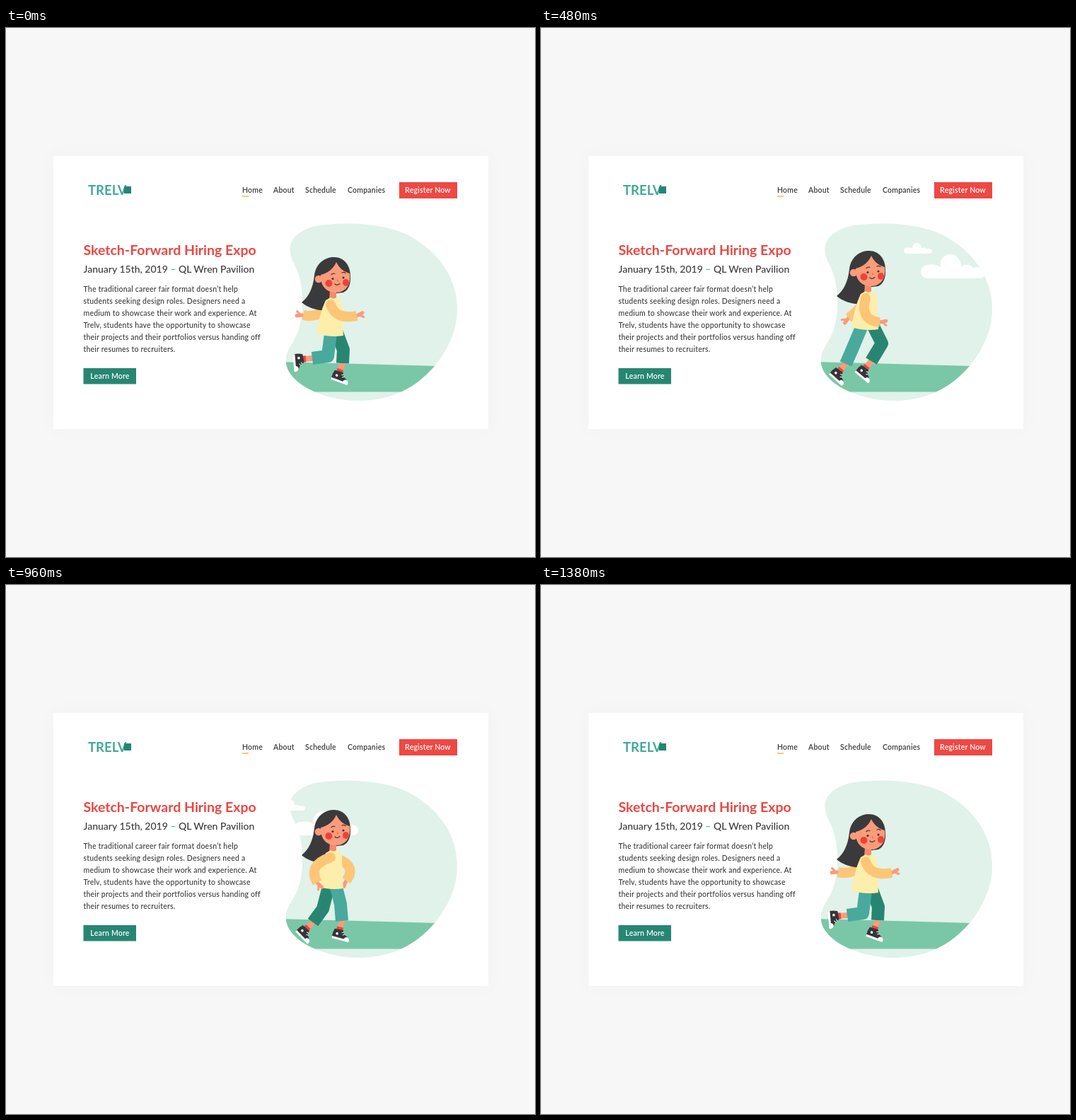
Write an HTML page that moves like this. It is 748 px wide and 748 px high and loops after 1440 ms.

```html
<!DOCTYPE html>
<html lang="en">
<head>
<meta charset="utf-8">
<title>Landing page</title>
<style>
  html, body { margin: 0; width: 100%; height: 100%; overflow: hidden; background: #f7f7f7; }
  svg { display: block; font-family: Lato, "Open Sans", sans-serif; fill: #3a3a3a; }
  .card { filter: drop-shadow(0 0 12px #00000005); }
  .small { font-size: 10.5px; font-weight: 500; letter-spacing: .2px; }
  .strong { font-weight: 600; }
  .limb { fill: none; stroke-linejoin: round; }
  .skin { fill: none; stroke: #fb9b7a; stroke-linecap: round; stroke-width: 5; }
  .line { fill: none; stroke: #3a3a3c; stroke-linecap: round; stroke-width: 1.2; }
</style>
</head>
<body>
<svg width="748" height="748" viewBox="0 0 748 748">
  <defs>
    <path id="blob" d="M437 280C480 273 540 276 574 296C614 319 638 355 638 398C638 428 624 456 606 478C582 506 548 527 500 527C452 527 412 508 399 484C391 466 399 455 408 440C424 412 422 360 408 335C396 313 398 291 437 280Z"/>
    <clipPath id="inBlob"><use href="#blob"/></clipPath>
    <path id="cloud" fill="#fff" d="M9 0A9 9.500 0 0 1 9-19Q22-21 28-16C24-38 56-42 57-17C66-22 72-18 74-15C92-20 98 0 82 0Z"/>
    <g id="shoe">
      <path fill="#363639" d="M-7-3L5-4Q7 2 13 4Q17 6 16 10H-8Q-9 3-7-3Z"/>
      <path fill="#fff" d="M-8 8H9Q10 4 14 4.500Q18 7 16.500 11H-8Z"/>
      <circle cx="-2" cy="3" r="1.800" fill="#fff"/>
      <path stroke="#fff" d="M4 0L7-1M6 3L9 1"/>
    </g>
  </defs>

  <rect class="card" x="67" y="181" width="615" height="386" fill="#fff"/>
  <use href="#blob" fill="#e0f2ea"/>
  <g clip-path="url(#inBlob)">
    <use id="smallCloud" href="#cloud"/>
    <use id="bigCloud" href="#cloud"/>
    <path fill="#7ac7a8" d="M390 472L610 478V514.500H390Z"/>
  </g>

  <text x="116" y="236" font-size="18.500" font-weight="700" fill="#41aa98">TRELV</text>
  <rect x="167" y="224" width="10" height="10" fill="#238672"/>
  <g class="small strong">
    <text x="334" y="232.500">Home</text>
    <text x="378" y="232.500">About</text>
    <text x="423" y="232.500">Schedule</text>
    <text x="483" y="232.500">Companies</text>
    <rect x="334" y="237" width="9" height="2" fill="#fcc877"/>
    <rect x="556" y="218" width="82" height="23" fill="#ee4844"/>
    <text x="596.500" y="232.500" text-anchor="middle" fill="#fff">Register Now</text>
    <rect x="109.500" y="481" width="74.500" height="22.500" fill="#278672"/>
    <text x="147" y="496" text-anchor="middle" fill="#fff">Learn More</text>
  </g>
  <text x="109.500" y="321" font-size="19.500" font-weight="700" fill="#ea4743">Sketch-Forward Hiring Expo</text>
  <text x="109.500" y="345.500" font-size="14" font-weight="500">January 15th, 2019 <tspan fill="#41aa98">–</tspan> QL Wren Pavilion</text>
  <g class="small">
    <text x="109.500" y="372.500">The traditional career fair format doesn’t help</text>
    <text x="109.500" y="389.500">students seeking design roles. Designers need a</text>
    <text x="109.500" y="406.500">medium to showcase their work and experience. At</text>
    <text x="109.500" y="423.500">Trelv, students have the opportunity to showcase</text>
    <text x="109.500" y="440.500">their projects and their portfolios versus handing off</text>
    <text x="109.500" y="457.500">their resumes to recruiters.</text>
  </g>

  <g id="farLeg" stroke="#278672"></g>
  <g id="nearLeg" stroke="#48a99c"></g>
  <g id="upper">
    <g id="farArm"></g>
    <path fill="#3a3a3c" d="M462 324C478 323 487 336 487 350C488 362 484 371 477 374L460 376C460 385 458 393 451 399C440 400 426 395 418 388C428 380 434 368 436 350C438 335 448 325 462 324Z"/>
    <path fill="#f58a6c" d="M458 370H467V385Q462 388 457 385Z"/>
    <path fill="#fdeeab" d="M452 385Q457 382 459 381Q463 384 467 381Q473 383 475 389C475 405 476 420 477 435Q458 438 439 432C442 415 445 400 452 385Z"/>
    <g id="nearArm"></g>
    <circle cx="442" cy="355" r="5.200" fill="#fb9b7a"/>
    <path fill="#fb9b7a" d="M445 349C454 347 463 341 467 331C472 341 479 345 486 347C488 361 482 373 468 374C454 375 444 365 445 349Z"/>
    <g fill="#ee4239"><circle cx="456.500" cy="361" r="5"/><ellipse cx="480.500" cy="360" rx="4.500" ry="5"/></g>
    <circle cx="462" cy="354.500" r="1.600"/><circle cx="477" cy="353" r="1.600"/>
    <path class="line" d="M460 348.500Q462 346.500 465 347.500M475 346Q478 344.500 480 346.500"/>
    <path class="line" d="M465 362Q468 365 472 361.500"/>
    <path fill="none" stroke="#ee6a55" d="M468 355L470 357.500L468 358"/>
  </g>
</svg>
<script>
const STEP = 60, LOOP = 1440, CYCLE = 12;
const $ = id => document.getElementById(id);
const bob = [0, -2, -9, -10, -6, 0];

// One walk cycle of a leg: knee x, y, cuff x, y, foot angle.
const legPoses = [
  [455, 464, 433, 467, 85],
  [477, 452, 456, 470, 80],
  [482, 446, 467, 471, 40],
  [481, 451, 479, 474, 6],
  [473, 451, 475, 475, 15],
  [477, 455, 476, 474, 20],
  [477, 455, 476, 474, 20],
  [455, 456, 446, 477, 48],
  [441, 452, 431, 475, 42],
  [443, 453, 430, 474, 46],
  [448, 458, 434, 477, 46],
  [455, 464, 433, 467, 85]
];

// Arm keys: step, elbow x, y, wrist x, y (relative to the upper body).
const nearKeys = [
  [0, 466, 413, 496, 407], [2, 448, 417, 463, 431], [4, 426, 402, 440, 427],
  [5, 442, 411, 454, 431], [7, 443, 413, 466, 431], [8, 450, 422, 479, 425], [11, 466, 413, 496, 407]
];
const farKeys = [
  [0, 442, 411, 420, 406], [2, 466, 410, 460, 424], [4, 498, 402, 481, 424],
  [5, 466, 410, 462, 424], [7, 450, 410, 450, 424], [8, 445, 412, 435, 419], [11, 442, 411, 420, 406]
];

function pose(keys, step) {
  const i = Math.max(1, keys.findIndex(k => k[0] >= step));
  const a = keys[i - 1], b = keys[i], f = (step - a[0]) / (b[0] - a[0]);
  return a.map((v, j) => v + (b[j] - v) * f).slice(1);
}

function drawLeg(id, step, hipY) {
  const [kx, ky, cx, cy, angle] = legPoses[step % CYCLE];
  const r = angle * Math.PI / 180, ux = -Math.sin(r), uy = Math.cos(r);
  const hipX = 462 + (kx - 462) * .4;
  const along = d => `${cx + ux * d} ${cy + uy * d}`;
  $(id).innerHTML = `
    <path class="limb" stroke="#fb9b7a" stroke-width="8" d="M${along(-4)}L${along(11)}"/>
    <path class="limb" stroke="#e9463f" stroke-width="9" d="M${along(9)}L${along(16)}"/>
    <use href="#shoe" stroke="none" transform="translate(${along(16)}) rotate(${angle})"/>
    <path class="limb" stroke-width="18" d="M${hipX} ${hipY}L${kx} ${ky}L${cx} ${cy}"/>`;
}

function drawArm(id, keys, step, shoulderX) {
  const [ex, ey, wx, wy] = pose(keys, step);
  const a = Math.atan2(wy - ey, wx - ex);
  const reach = (d, turn) => `${wx + d * Math.cos(a + turn)} ${wy + d * Math.sin(a + turn)}`;
  $(id).innerHTML = `
    <path class="skin" d="M${wx} ${wy}L${reach(9, -.3)}"/>
    <path class="skin" style="stroke-width:3" d="M${reach(4, 0)}L${reach(10, .35)}"/>
    <path class="limb" stroke="#fcc676" stroke-width="14" d="M${shoulderX} 391Q${ex} ${ey} ${wx} ${wy}"/>
    <circle cx="${shoulderX}" cy="391" r="7" fill="#fcc676"/>`;
}

function draw(now) {
  const frame = Math.floor(now % LOOP / STEP), step = frame % CYCLE;
  const dy = bob[step % 6], drift = frame * 16.25;
  $("smallCloud").setAttribute("transform", `translate(${643 - drift} 319) scale(.44)`);
  $("bigCloud").setAttribute("transform", `translate(${667 - drift} 354)`);
  $("upper").setAttribute("transform", `translate(0 ${dy})`);
  drawLeg("farLeg", step + 6, 431 + dy);
  drawLeg("nearLeg", step, 431 + dy);
  drawArm("farArm", farKeys, step, 463);
  drawArm("nearArm", nearKeys, step, 459);
  requestAnimationFrame(tick);
}

const start = performance.now();
const tick = () => draw(performance.now() - start);
tick();
</script>
</body>
</html>
```
